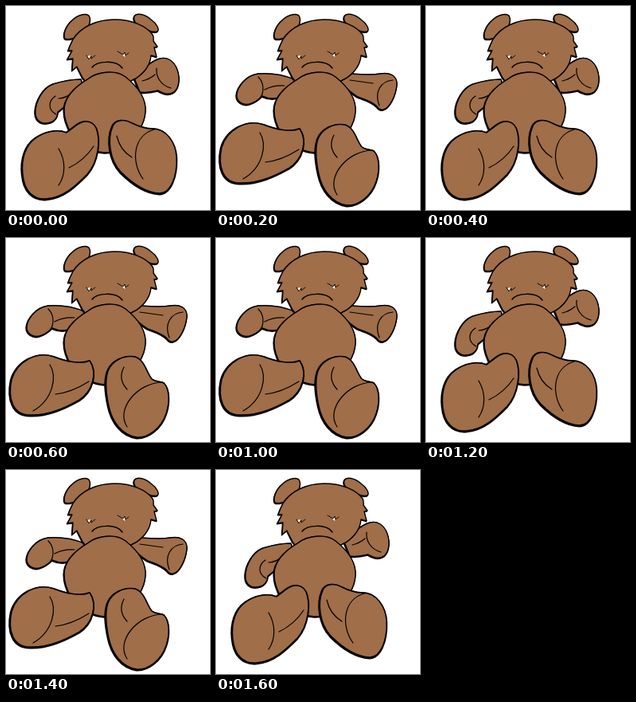
Write an HTML page with a canvas that moves like this. It is 256x256 px and loops after 1.8 s.

```html
<!DOCTYPE html>
<html lang="en">
<head>
<meta charset="utf-8">
<title>Teddy bear</title>
<style>
html, body { margin: 0; width: 100%; height: 100%; overflow: hidden; background: #fff; }
canvas { display: block; width: 256px; height: 256px; }
</style>
</head>
<body>
<canvas id="stage" width="256" height="256"></canvas>
<script>
const ctx = document.getElementById('stage').getContext('2d');
const FUR = '#a06e49', INK = '#000';
const STEP = 200, LOOP = 1800;

const ears = [
  'M74 41 C71 36 75 25 83 18 C91 10 103 8 105 14 C107 19 104 25 101 30 L89 39 C84 41 78 43 74 41Z',
  'M161 13 C164 8 174 10 182 17 C189 22 193 29 190 32 C185 34 178 31 171 28 C164 24 159 18 161 13Z'
];
const head = 'M84 42 C94 26 114 17 136 17 C158 17 176 25 184 36 C186 39 185 42 185 44 L190 51 L186 52 L189 64 L182 62 C181 75 174 83 164 90 L145 100 L104 100 L96 90 L89 76 L83 81 L84 66 L77 67 L83 56 L78 56 C80 50 82 46 84 42Z';
const body = 'M104 91 C114 83 137 79 150 89 C165 101 176 116 175 132 C174 151 162 163 151 174 C143 181 134 184 124 184 C109 183 91 174 82 160 C76 150 73 142 73 131 C73 114 87 101 104 91Z';

const poses = [
  {
    arms: [
      'M94 92 C83 92 72 94 59 98 C46 103 38 119 37 131 C36 142 42 147 50 147 C59 147 65 141 65 133 C75 125 87 116 98 104Z',
      'M160 88 C168 83 178 72 190 67 C202 62 211 69 215 80 C219 92 217 105 209 109 C203 112 196 109 191 106 C183 108 174 109 168 108Z'
    ],
    legs: [
      'M113 153 C108 143 97 143 88 150 C83 154 80 156 76 159 C64 154 48 158 37 166 C24 175 19 193 21 211 C23 232 34 243 50 242 C72 241 88 225 102 211 C116 195 119 168 113 153Z',
      'M134 151 C138 142 149 142 158 147 C166 151 174 154 184 154 C201 154 213 171 214 190 C215 215 206 235 193 235 C173 234 157 221 144 208 C130 193 127 167 134 151Z'
    ],
    armFolds: 'M62 113 C53 119 52 130 63 136 M66 116 Q75 116 84 108 M189 78 C188 88 193 99 207 103 M171 94 Q180 92 187 86',
    legFolds: 'M66 179 C75 194 75 212 66 225 M79 203 Q98 194 110 176 M186 155 C160 162 156 195 172 217 M139 163 Q143 181 158 190'
  },
  {
    arms: [
      'M98 92 C84 86 68 84 53 85 C38 87 27 101 26 112 C26 120 34 125 42 123 C49 121 54 117 58 113 C66 117 74 117 83 114 L98 104Z',
      'M154 84 C168 84 188 88 206 85 C218 83 227 87 227 98 C226 112 218 128 210 130 C206 131 204 129 202 126 C195 119 186 117 178 114 C170 109 163 104 157 96Z'
    ],
    legs: [
      'M105 154 C94 159 75 155 60 149 C39 142 14 154 7 178 C2 202 9 222 30 222 C53 223 74 213 92 203 C109 192 115 169 105 154Z',
      'M128 167 C133 154 148 147 161 149 C174 152 176 169 183 177 C188 181 194 180 198 182 C206 190 205 208 201 220 C195 239 178 251 164 250 C145 247 133 230 129 211 C125 192 124 179 128 167Z'
    ],
    armFolds: 'M53 89 C62 98 59 110 56 114 M61 105 Q72 99 86 100 M222 93 C207 94 198 108 205 125 M168 93 Q182 95 197 97',
    legFolds: 'M55 159 C64 173 60 202 34 217 M62 196 Q82 194 104 180 M197 181 C165 181 137 215 152 237 M148 162 Q140 177 152 190'
  }
];

function line(path, width) {
  ctx.lineWidth = width;
  ctx.stroke(new Path2D(path));
}

// A slightly shifted dark copy gives the outline its heavier lower-left side.
function part(path, weight) {
  const shape = new Path2D(path);
  ctx.save();
  ctx.translate(-0.5, 0.7);
  ctx.lineWidth = weight;
  ctx.stroke(shape);
  ctx.restore();
  ctx.fillStyle = FUR;
  ctx.fill(shape);
  ctx.lineWidth = 1.4;
  ctx.stroke(shape);
}

function drawFace() {
  ctx.fillStyle = '#fff';
  ctx.fill(new Path2D('M102 63 L106 62 L105 67Z M146 61 L150 59 L149 64Z'));
  line('M101 62 L104 67 L107 63 L107 66 L112 62 M140 57 L147 61 L149 58 L150 62 L154 59', 0.9);
  line('M108 77 C114 69 138 67 146 78', 1.5);
}

function drawBear(pose) {
  ctx.fillStyle = '#fff';
  ctx.fillRect(0, 0, 256, 256);
  ctx.strokeStyle = INK;
  ctx.lineCap = ctx.lineJoin = 'round';
  ears.forEach(path => part(path, 1.6));
  pose.arms.forEach(path => part(path, 2.4));
  line(pose.armFolds, 1.2);
  part(head, 1.4);
  drawFace();
  part(body, 2.2);
  pose.legs.forEach(path => part(path, 3.4));
  line(pose.legFolds, 1.2);
}

const start = performance.now();
function tick() {
  const time = (performance.now() - start) % LOOP;
  drawBear(poses[Math.floor(time / STEP) % 2]);
  requestAnimationFrame(tick);
}
tick();
</script>
</body>
</html>
```
